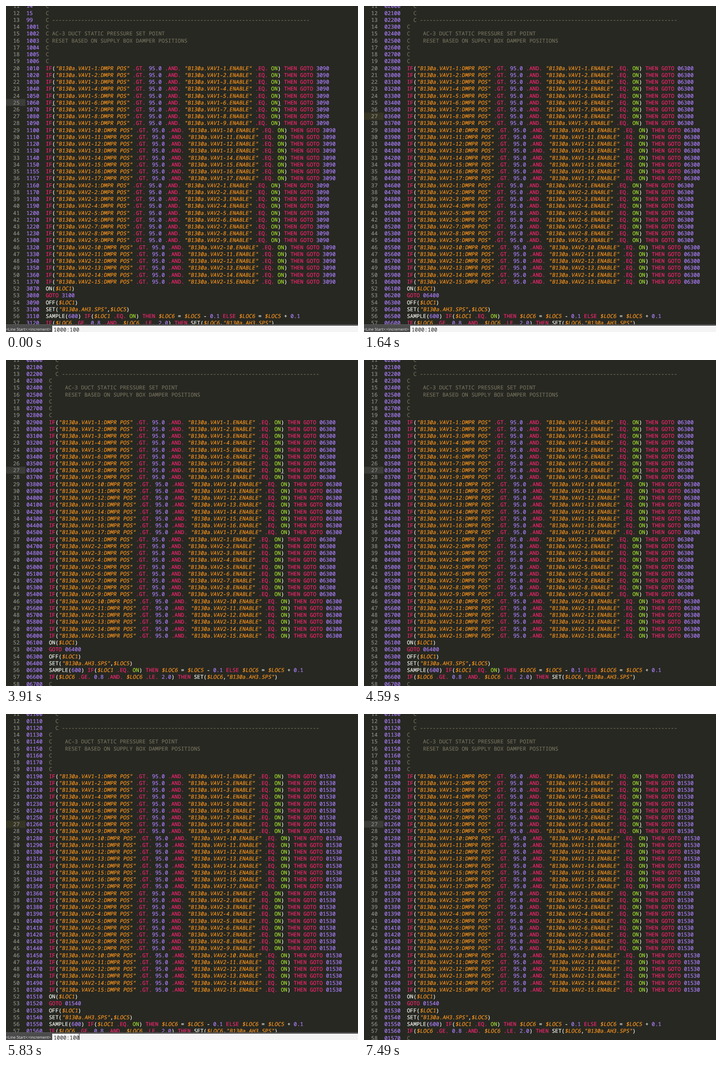
Write an HTML page that moves like this. It is 777x721 px and loops after 8000 ms.

```html
<!DOCTYPE html>
<html lang="en">
<head>
<meta charset="utf-8">
<title>Line renumbering</title>
<style>
html, body { margin: 0; width: 100%; height: 100%; overflow: hidden; background: #272822; }
svg { display: block; width: 777px; height: 721px; background: #272822; }
text {
  font: 11.667px "Noto Sans Mono", monospace; white-space: pre;
  text-rendering: geometricPrecision; font-variant-ligatures: none;
  fill: #f8f8f2;
}
#code text { stroke-width: .2px; stroke: currentColor; fill: currentColor; color: #f8f8f2; }
#code .num { color: #90908a; }
#code .n { color: #ae81ff; }
#code .k { color: #f92672; }
#code .g { color: #a6e22e; }
#code .c { color: #75715e; }
#code .s { color: #fd971f; }
.bar { fill: #3c3c38; }
.typing { fill: #363524; }
.mark { fill: #a5a59c; }
.cursor { fill: #f8f8f0; }
.caret { fill: #111; }
#panel .label { font: 8.45px "Open Sans", sans-serif; fill: #f2f2f2; }
#panel .value { font-size: 11.85px; fill: #272727; }

[style*="--a"] { animation: var(--a) 8s step-end infinite; }
@keyframes first { 0% { opacity: 1 } 3.375% { opacity: 0 } }
@keyframes second { 0% { opacity: 0 } 3.375% { opacity: 1 } 60.75% { opacity: 0 } }
@keyframes third { 0% { opacity: 0 } 60.75% { opacity: 1 } }
@keyframes open { 0% { opacity: 1 } 48.875% { opacity: 0 } 60.75% { opacity: 1 } 88.5% { opacity: 0 } }
@keyframes idle { 0% { opacity: 0 } 48.875% { opacity: 1 } 60.75% { opacity: 0 } 88.5% { opacity: 1 } }
@keyframes blinkEnd {
  0% { opacity: 0 } 3.375% { opacity: 1 } 5.25% { opacity: .5 } 6.875% { opacity: 0 }
  13.625% { opacity: 1 } 20.5% { opacity: 0 } 27.5% { opacity: 1 } 34.75% { opacity: 0 }
  60.75% { opacity: 1 } 64.125% { opacity: .5 } 66% { opacity: 0 }
  72.875% { opacity: 1 } 77.875% { opacity: 0 } 86.625% { opacity: 1 } 88.5% { opacity: 0 }
}
@keyframes blinkBack { 0% { opacity: 0 } 38.125% { opacity: 1 } 43.5% { opacity: .5 } 45.375% { opacity: 0 } }
@keyframes blinkCode {
  0% { opacity: 0 } 48.875% { opacity: .5 } 50.375% { opacity: 1 } 55.5% { opacity: .9 } 57.375% { opacity: 0 }
  88.5% { opacity: 1 } 92% { opacity: .5 } 93.625% { opacity: 0 }
}
</style>
</head>
<body>
<svg id="stage" viewBox="0 0 777 721" xml:space="preserve"></svg>
<script>
// The editor is a grid of 7 by 15 cells, slightly enlarged
const SCALE = 777 / 765, CHAR = 7, LINE = 15, LEFT = 44.3;
const colX = c => LEFT + c * CHAR;
const rowTop = r => 232.4 + (r - 27) * LINE;
const baseline = r => rowTop(r) + 12;

const escape = s => s.replace(/&/g, '&amp;').replace(/</g, '&lt;').replace(/>/g, '&gt;');
const rect = (x, y, w, h, attrs) => `<rect x="${x}" y="${y}" width="${w}" height="${h}" ${attrs}/>`;
const group = (anim, html) => `<g style="--a:${anim}">${html}</g>`;

function word(text, col, r, cls) {
  const lean = cls === 's' ? ' skewX(-10)' : '';
  return `<text class="${cls}" transform="translate(${colX(col)} ${baseline(r)})${lean}">${escape(text)}</text>`;
}

const TOKEN = /"[^"]*"|\$\w+|\.[A-Z]+\.|\w+(?:\.\d+)?|\S/g;
function kind(token, at) {
  if (/^["$]/.test(token)) return 's';
  if (/^(\.[A-Z]+\.|IF|THEN|ELSE|GOTO)$/.test(token)) return 'k';
  if (/^\d/.test(token)) return 'n';
  return token === 'ON' && at > 0 ? 'g' : '';
}
const paint = (code, col, r) => [...code.matchAll(TOKEN)]
  .map(m => word(m[0], col + m.index, r, kind(m[0], m.index))).join('');

// Irregular numbering before the lines are renumbered
const MIXED = { 11: 14, 12: 15, 13: 99, 35: 1155, 36: 1157, 45: 1300 };
function mixed(r) {
  if (MIXED[r]) return MIXED[r];
  if (r < 20) return 987 + r;
  if (r < 35) return 1010 + (r - 20) * 10;
  if (r < 45) return 1160 + (r - 37) * 10;
  if (r < 52) return 1320 + (r - 46) * 10;
  return 3070 + (r - 52) * 10;
}
const stepped = (start, step) => r => String(start + (r - 11) * step).padStart(5, '0');

function comment(r, tidy) {
  const gap = tidy ? '    ' : ' ';
  const text = {
    13: ' ' + '-'.repeat(80),
    15: gap + 'AC-3 DUCT STATIC PRESSURE SET POINT',
    16: gap + 'RESET BASED ON SUPPLY BOX DAMPER POSITIONS'
  }[r] || '';
  return (tidy && r < 14 ? '  ' : '') + 'C' + text;
}
const remark = (text, col, r) => [...text.matchAll(/\S+/g)]
  .map(m => word(m[0], col + m.index, r, 'c')).join('');

function statement(r, label) {
  if (r < 52) {
    const box = r < 37 ? `B130a.VAV1-${r - 19}` : `B130a.VAV2-${r - 36}`;
    return `IF("${box}:DMPR POS" .GT. 95.0 .AND. "${box}.ENABLE" .EQ. ON) THEN GOTO ${label(54)}`;
  }
  return [
    'ON($LOC1)',
    `GOTO ${label(55)}`,
    'OFF($LOC1)',
    'SET("B130a.AH3.SPS",$LOC5)',
    'SAMPLE(600) IF($LOC1 .EQ. ON) THEN $LOC6 = $LOC5 - 0.1 ELSE $LOC6 = $LOC5 + 0.1',
    'IF($LOC6 .GE. 0.8 .AND. $LOC6 .LE. 2.0) THEN SET($LOC6,"B130a.AH3.SPS")'
  ][r - 52];
}

function listing(label, tidy) {
  const col = tidy ? 7 : 6;
  let html = '';
  for (let r = 11; r <= 58; r++) {
    html += word(String(r), -4.1, r, 'num') + word(String(label(r)), 0, r, 'n');
    html += r < 20 || r > 57
      ? remark(comment(r, tidy), col, r)
      : paint(statement(r, label), col, r);
  }
  return html;
}

const bar = (r, attrs) => rect(0, rowTop(r), 42.3, LINE, attrs);
const marks = (r, ...cols) => cols
  .map(c => rect(colX(c), rowTop(r) + 13.5, CHAR, 1, 'class="mark"')).join('');
const active = bar(27, 'class="bar"') + bar(27, 'class="typing" style="--a:open"') +
  group('idle', marks(27, 9, 79));

const code =
  group('first', bar(25, 'class="bar"') + listing(mixed, false) + marks(25, 8, 78)) +
  group('second', active + listing(stepped(2000, 100), true)) +
  group('third', active + listing(stepped(1100, 10), true)) +
  rect(506, 233, 1, 14, 'class="cursor" style="--a:blinkCode"');

const panel =
  rect(0, 704, 777, 17, 'fill="#4b4b4b"') +
  rect(0, 704, 777, 1, 'fill="#5e5e5e"') +
  rect(102, 707, 675, 14, 'fill="#f4f4f4"') +
  `<text class="label" x="0" y="718">${escape('<Line Start>:<increment>')}</text>` +
  '<text class="value" x="105" y="720">1000:100</text>';

document.getElementById('stage').innerHTML =
  `<g id="code" transform="scale(${SCALE})">${code}</g>` +
  `<g id="panel" style="--a:open">${panel}</g>` +
  rect(161, 707, 1, 14, 'class="caret" style="--a:blinkEnd"') +
  rect(154, 707, 1, 14, 'class="caret" style="--a:blinkBack"');
</script>
</body>
</html>
```
